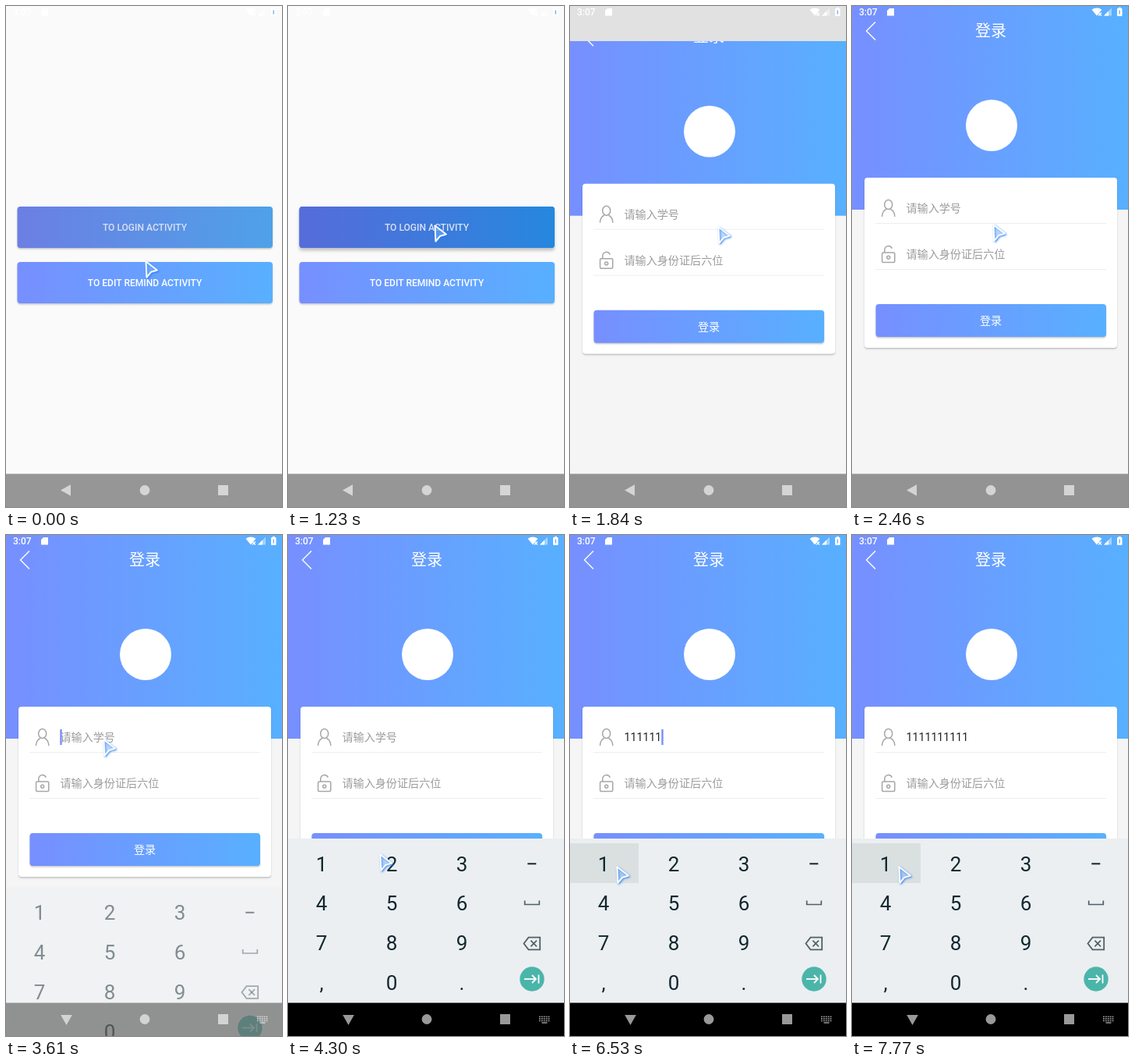
Write an HTML page with a canvas that moves like this. It is 354x642 px and loops after 8 s.

```html
<!DOCTYPE html>
<html lang="zh-CN">
<head>
<meta charset="utf-8">
<title>Login demo</title>
<style>
html, body { margin: 0; width: 100%; height: 100%; overflow: hidden; background: #fafafa; }
canvas { display: block; width: 354px; height: 642px; }
</style>
</head>
<body>
<canvas id="stage"></canvas>
<script>
const W = 354, H = 642, NAV = 599.5, LOOP = 8000, STEP = 76.8;
const canvas = document.getElementById('stage');
const ctx = canvas.getContext('2d');
const dpr = window.devicePixelRatio || 1;
canvas.width = W * dpr;
canvas.height = H * dpr;

const LATIN = 'Roboto, sans-serif';
const CJK = '"Noto Sans CJK SC", "Noto Sans CJK", sans-serif';
const BLUE = ['#778fff', '#58b0ff'];
const HOVER = ['#6b7fe3', '#4fa1e8'];
const PRESSED = ['#566cd9', '#2687de'];
const GREY = '#a6a6a6', HINT = '#9c9c9c';

const TAP = 930, OPEN = 1490, FOCUS = 3220, SLIDE = 3610, HOLD = 5440;
const FIRST_KEY = 5610, KEY_GAP = 183, DIGITS = 10, BLINK = 485;

// Pointer moves: start, end, target x, target y
const HOME = [179, 327];
const MOVES = [
  [0, 310, 188, 281], [1530, 1840, 190, 283], [2390, 2880, 125, 262],
  [4070, 4300, 118, 409], [4300, 4560, 112, 434], [4560, 5200, 60, 425]
];

const clamp = v => Math.max(0, Math.min(1, v));
const mix = (a, b, p) => a + (b - a) * p;
const progress = (t, start, length) => clamp((t - start) / length);

function pointerAt(t) {
  return MOVES.reduce(([x, y], [from, to, toX, toY]) => {
    const p = progress(t, from, to - from);
    return [mix(x, toX, p), mix(y, toY, p)];
  }, HOME);
}

function box(x, y, w, h, fill, r = 0) {
  ctx.fillStyle = fill;
  ctx.beginPath();
  ctx.roundRect(x, y, w, h, r);
  ctx.fill();
}

function disc(x, y, r, fill) {
  ctx.fillStyle = fill;
  ctx.beginPath();
  ctx.arc(x, y, r, 0, Math.PI * 2);
  ctx.fill();
}

function trace(points, close) {
  ctx.beginPath();
  points.forEach(p => ctx.lineTo(...p));
  if (close) ctx.closePath();
}

function poly(points, fill) {
  trace(points, true);
  ctx.fillStyle = fill;
  ctx.fill();
}

function line(points, color, width, close) {
  trace(points, close);
  ctx.strokeStyle = color;
  ctx.lineWidth = width;
  ctx.stroke();
}

function cross(x, y, r, color, width) {
  line([[x - r, y - r], [x + r, y + r]], color, width);
  line([[x + r, y - r], [x - r, y + r]], color, width);
}

function chevron(x, y, r, color, width) {
  line([[x - r, y - Math.abs(r)], [x, y], [x - r, y + Math.abs(r)]], color, width);
}

function text(str, x, y, font, color, align = 'center') {
  ctx.font = font;
  ctx.fillStyle = color;
  ctx.textAlign = align;
  ctx.fillText(str, x, y);
}

function shade(color, blur, dx, dy) {
  ctx.shadowColor = color;
  ctx.shadowBlur = blur * dpr;
  ctx.shadowOffsetX = dx * dpr;
  ctx.shadowOffsetY = dy * dpr;
}
const unshade = () => shade('transparent', 0, 0, 0);

function gradient(x0, x1, colors) {
  const g = ctx.createLinearGradient(x0, 0, x1, 0);
  colors.forEach((c, i) => g.addColorStop(i, c));
  return g;
}

function raised(x, y, w, h, fill, lift = 1) {
  shade('rgba(0,0,0,.22)', 1 + lift, 0, .5 + lift);
  box(x, y, w, h, fill, 4);
  unshade();
}

function button(x, y, w, h, colors, lift) {
  raised(x, y, w, h, gradient(x, x + w, colors), lift);
}

function homePage(t) {
  const press = progress(t, TAP, 300);
  const font = '500 12.05px ' + LATIN;
  box(0, 0, W, H + 20, '#fafafa');
  button(14.5, 257, 327.5, 53, HOVER, 1 + press * 2);
  ctx.globalAlpha = press;
  box(14.5, 257, 327.5, 53, gradient(14.5, 342, PRESSED), 4);
  ctx.globalAlpha = 1;
  text('TO LOGIN ACTIVITY', 178, 288.2, font, '#d9e0f4');
  button(14.5, 328, 327.5, 53, BLUE);
  text('TO EDIT REMIND ACTIVITY', 178, 359.2, font, '#fff');
}

function personIcon(x, y) {
  ctx.strokeStyle = GREY;
  ctx.lineWidth = 1.5;
  ctx.beginPath();
  ctx.ellipse(x, y - 4.5, 5, 6, 0, 0, Math.PI * 2);
  for (const side of [-1, 1]) {
    ctx.moveTo(x + side * 8.2, y + 11);
    ctx.quadraticCurveTo(x + side * 7.8, y + 3.5, x + side * 2.8, y + 1.5);
  }
  ctx.stroke();
}

function lockIcon(x, y) {
  ctx.strokeStyle = GREY;
  ctx.lineWidth = 1.5;
  ctx.beginPath();
  ctx.roundRect(x - 8.1, y - 2, 16.2, 12.5, 1.5);
  ctx.moveTo(x - 4.9, y - 2);
  ctx.arc(x, y - 5.5, 4.9, Math.PI, -.35);
  ctx.moveTo(x + 2, y + 4.3);
  ctx.arc(x, y + 4.3, 2, 0, Math.PI * 2);
  ctx.stroke();
}

function caretOn(t, typed) {
  const wake = typed ? FIRST_KEY + (typed - 1) * KEY_GAP : FOCUS + 210;
  return t >= FOCUS && (t - wake) % (2 * BLINK) < BLINK;
}

function loginPage(t) {
  const font = '14.1px ' + CJK;
  box(0, 0, W, H + 30, '#f5f5f5');
  box(0, 0, W, 261, gradient(0, W, BLUE));
  chevron(18.5, 32, -11.5, '#fff', 1.4);
  text('登录', 178, 38.6, '20px ' + CJK, '#fff');
  disc(179, 153, 33, '#fff');

  raised(16, 220, 324, 218, '#fff');
  personIcon(46.7, 259);
  lockIcon(46.7, 318);
  for (const y of [278, 337]) box(30, y, 296, 1, '#eee');

  const typed = t < FIRST_KEY ? 0 : Math.min(DIGITS, 1 + Math.floor((t - FIRST_KEY) / KEY_GAP));
  if (typed) text('1'.repeat(typed), 69.5, 264, '14.2px ' + LATIN, '#222', 'left');
  else text('请输入学号', 69.5, 264.3, font, HINT, 'left');
  text('请输入身份证后六位', 69.5, 323.3, font, HINT, 'left');
  if (caretOn(t, typed)) box(69.3 + typed * 8, 249, 2.4, 20, BLUE[0]);

  button(30.5, 382, 295.5, 42, BLUE);
  text('登录', 178, 408.2, font, '#fff');
}

function keyboard(t, p) {
  if (t < SLIDE - 5) return;
  const ink = '#12272f', soft = '#526067';
  ctx.save();
  ctx.globalAlpha = mix(.5, 1, p);
  ctx.translate(0, 62.5 * (1 - p) ** 2);
  box(0, 389, W, H - 389, '#ebeff1');
  if (t >= HOLD) box(0, 395, 88, 51, '#dadfe0');
  ['123', '456', '789', ',0.'].forEach((row, r) => {
    [...row].forEach((c, i) => text(c, 43 + i * 90, 430.5 + r * 50.9, '26px ' + LATIN, ink));
  });
  box(307.3, 420.3, 11, 2, ink);
  line([[303.7, 468.5], [303.7, 473.5], [322.3, 473.5], [322.3, 468.5]], soft, 1.7);
  line([[302.5, 523.5], [308.5, 515.7], [323.2, 515.7], [323.2, 531.3], [308.5, 531.3]], soft, 1.8, true);
  cross(315.2, 523.5, 3.8, soft, 1.7);
  disc(313, 569, 15.7, '#4bb5aa');
  line([[303, 569], [318, 569]], '#fff', 1.8);
  chevron(318, 569, 5, '#fff', 1.8);
  box(320.6, 563.5, 1.8, 11, '#fff');
  ctx.restore();
}

function triangle(x, y, turn, fill) {
  ctx.save();
  ctx.translate(x, y);
  ctx.rotate(turn);
  poly([[-6.5, 0], [6.5, -7.3], [6.5, 7.3]], fill);
  ctx.restore();
}

function navBar(t, p) {
  const ink = 'rgba(255,255,255,.6)';
  box(0, NAV, W, H - NAV, `rgba(0,0,0,${mix(.4, 1, p)})`);
  disc(178, 620.5, 6.4, ink);
  box(272, 614, 13, 13, ink);
  if (t < SLIDE - 165) return triangle(76.5, 620.5, 0, ink);
  triangle(77.5, 621.5, -Math.PI / 2, ink);
  for (let i = 0; i < 15; i++) {
    box(322 + i % 5 * 2.9, 616.5 + Math.floor(i / 5) * 2.6, 1.8, 1.6, ink);
  }
  box(325.5, 624.3, 7, 1.5, ink);
}

function statusBar() {
  text('3:07', 9, 12.3, '500 12px ' + LATIN, '#fff', 'left');
  poly([[48, 3], [54, 3], [54, 12.5], [45, 12.5], [45, 6]], '#fff');
  ctx.fillStyle = '#fff';
  ctx.beginPath();
  ctx.moveTo(314, 12.5);
  ctx.arc(314, 12.5, 10, -2.27, -.87);
  ctx.fill();
  cross(318, 10.5, 2, '#fff', 1.2);
  poly([[323, 12.5], [333, 2.5], [333, 12.5]], 'rgba(255,255,255,.45)');
  poly([[323, 12.5], [329, 6.5], [329, 12.5]], '#fff');
  box(340, 3, 6.5, 10, '#fff', 1);
  box(341.8, 1.8, 3, 1.5, '#fff');
  box(342.5, 5.5, 1.5, 5, '#7fb4f5');
}

function pointer(q) {
  const [x, y] = pointerAt(q);
  const arrow = [[0, 0], [14.3, 11], [6.6, 13.2], [1, 20]];
  ctx.save();
  ctx.translate(x + .5, y + .5);
  ctx.lineJoin = 'round';
  shade('rgba(35,125,240,1)', 2.5, 1.2, 1.2);
  line(arrow, '#fff', 2, true);
  unshade();
  poly(arrow, 'rgba(120,175,248,.5)');
  line(arrow, '#fff', 1.4, true);
  ctx.restore();
}

function draw(t) {
  // The screen refreshes in even steps
  const q = Math.floor((t + 10) / STEP) * STEP;
  const open = q < OPEN + 30 ? 0 : progress(q, OPEN, 570);
  const slide = progress(q, SLIDE, 305);
  ctx.setTransform(dpr, 0, 0, dpr, 0, 0);
  if (open < 1) {
    ctx.save();
    ctx.translate(0, -13 * open);
    homePage(q);
    ctx.restore();
    box(0, 0, W, H, `rgba(0,0,0,${.1 * clamp(open * 2)})`);
  }
  if (open > 0) {
    const rest = 1 - open;
    ctx.save();
    ctx.beginPath();
    ctx.rect(0, Math.round(H * rest ** 2.75), W, H);
    ctx.clip();
    ctx.translate(0, 26 * rest ** 1.25);
    loginPage(t);
    ctx.restore();
  }
  keyboard(t, slide);
  navBar(t, slide);
  statusBar();
  pointer(q);
}

const start = performance.now();
function tick() {
  draw((performance.now() - start) % LOOP);
  requestAnimationFrame(tick);
}
tick();
</script>
</body>
</html>
```
